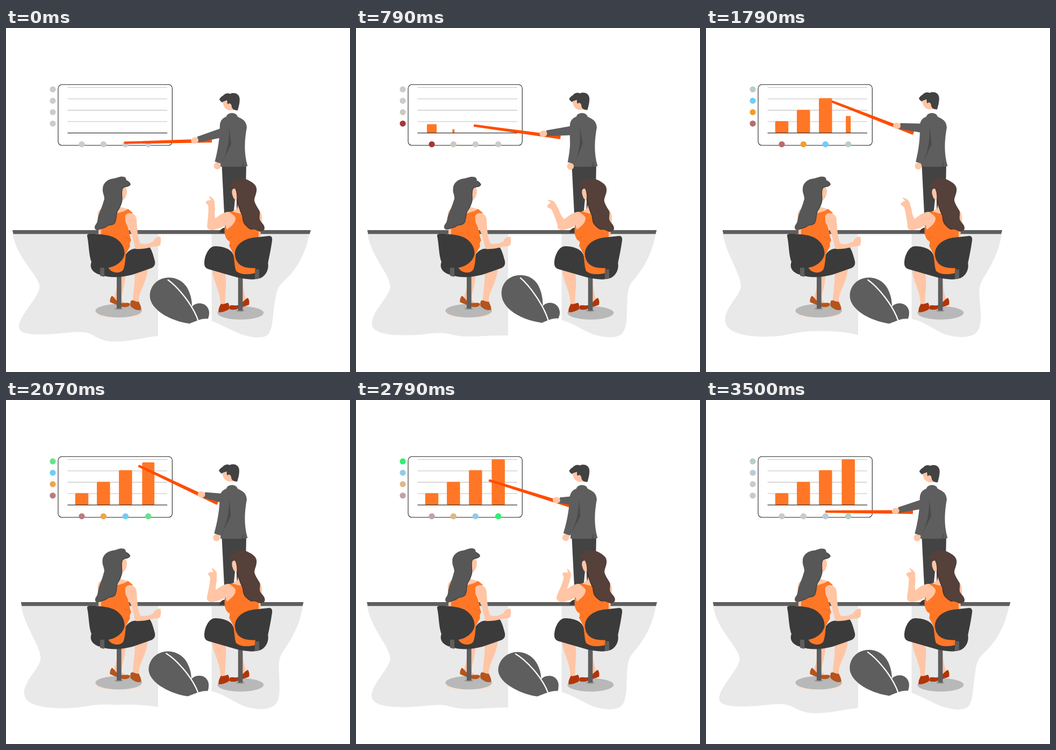
Animation, 640 px wide and 640 px high, one loop 3570 ms. Source, as an HTML page:

```html
<!DOCTYPE html>
<html lang="en">
<head>
<meta charset="utf-8">
<title>Presentation</title>
<style>
html, body { margin: 0; width: 100%; height: 100%; overflow: hidden; background: #fff; }
svg { display: block; width: 100%; height: 100%; }
.skin { fill: #ffc5a5; }
.orange { fill: #ff7726; }
.dark { fill: #3b3b3b; }
.suit { fill: #5e5e5e; }
.floor { fill: #e9e9e9; }
.line { fill: none; }
</style>
</head>
<body>
<svg viewBox="0 0 640 640">
  <path id="floorL" class="floor"/>
  <path id="floorR" class="floor"/>
  <path id="edge" class="suit"/>

  <path id="leaf" class="suit"/>
  <path id="vein" class="line" stroke="#fff" stroke-width="2.3"/>

  <g id="board">
    <rect class="line" x="97" y="105.3" width="212.3" height="113" rx="7" stroke="#222" stroke-width="1.1"/>
    <path class="line" stroke="#ccc" stroke-width="1.3" d="M114.5,110.6H300M114.5,131.8H300M114.5,153H300M114.5,174.2H300"/>
    <g id="bars" class="orange"></g>
    <path class="line" stroke="#333" stroke-width="1.2" d="M114.5,195.3H300"/>
    <g id="dots"></g>
  </g>

  <g id="man">
    <path id="pointer" fill="#ff4d00" stroke="#ff4d00" stroke-width="2" stroke-linejoin="round" d="M0,-1.2L161,-2.5V2.5L0,1.2Z"/>
    <path fill="#434343" d="M401.5,256H447L445,350H430L428,298L423,350V378H408L406,345Z"/>
    <path class="dark" d="M397,381C397,376 402,372 408,371H412V381Z"/>
    <g id="head">
      <path class="skin" d="M403,136C403.5,144 407,151 415,153H424V136Z"/>
      <path fill="#424242" d="M397,133C399,128 403,127 405,124.5C409,120.5 414,121 417,122.5C424,119 433,122 434.5,130C435.5,138 433,146 431,153.3C427,153 422,153 420,147C420,141 415,138 413,142C411,140 412,137 411,134.5C408,136.5 406,135 402,138.5C400,137 398,135 397,133Z"/>
    </g>
    <path class="suit" d="M410,165C411,157 428,155 431,165C438,169 447,171 448,185C444,207 442,232 449.5,257C434,259 415,258 399,258C400,235 397,205 398,180C399,171 404,167 410,165Z"/>
    <path class="line" stroke="#444" stroke-width="1.2" d="M441.5,250L440,258"/>
    <g id="sleeve">
      <ellipse class="skin" cx="393" cy="256.5" rx="6.3" ry="6.5"/>
      <path fill="#4b4b4b" d="M415.5,184L419,216L402,250L404,235Z"/>
      <path class="suit" d="M398,178C398,205 394,228 388.5,248.5L400.5,252.5C411,233 416,210 415.5,182Z"/>
    </g>
    <path id="arm" class="suit"/>
    <ellipse id="hand" class="skin" rx="7" ry="5.8"/>
  </g>

  <g id="womanL">
    <ellipse cx="209" cy="534" rx="43" ry="5" fill="#f6e2d7"/>
    <ellipse cx="209.7" cy="526" rx="43.3" ry="12.5" fill="#b8b8b8"/>
    <ellipse cx="209.7" cy="522" rx="8" ry="2.2" fill="#999"/>
    <path class="skin" d="M207,460H222C222,480 213,498 216,507L223,513L203,507C199,499 206,490 207,475ZM239,453L264,447C261,478 246,490 247,510L236,508C236,490 241,475 239,453Z"/>
    <path fill="#b5541c" d="M197,498C203,502 205,509 213,511C220,513 226,509 231,513C230,519 223,520 217,519C208,516 200,513 193.5,510C193,506 194,502 197,498ZM233,507C239,506 240,510 247,509C249,514 252,518 251.5,524C244,527 236,522 231.5,517C231,513 231,510 233,507Z"/>
    <rect class="suit" x="206" y="458" width="8.6" height="64"/>
    <path class="dark" d="M159,435C155,445 160,455 175,459C195,466 215,464 235,459L268,447.5C276,445 278,440 277,434C274,422 271,412 266,406L240,410.5C232,411 224,417 221,425L215,438Z"/>
    <path class="skin" d="M177,336C169,341 170,350 172,360V385H181L184,345ZM217,296C222,293 225.5,299 225,306C224,313 221,318 217,320.5C213,315 213,305 217,296ZM212,333C219,334 224,336 229,338L222,347H202Z"/>
    <path class="orange" d="M203,347C211,342 221,342 227,336.5L236,344L231,349C225,346 221,354 223,362C230,374 229,385 233,395C230,399 230,403 231,406L223,420C222,432 221,444 218,450C215,454 210,455 206,455C195,454 188,448 186,430L178,395C176,380 177,370 180,360Z"/>
    <path class="line" stroke="#e5641a" d="M219,388L230,393"/>
    <path class="skin" d="M222,349C227,341 241,343 243,356C244,376 245,390 250,401C260,403 267,401 274,397C276,391 283,388 287,388C289,393 288.5,400 286.5,404.5C282,407 277,406 273,407C262,410 250,412 241,411C237,398 236,386 229,374C224,365 221,356 222,349Z"/>
    <path class="dark" d="M151,387C150.5,383 154,383 158,383C176,383 195,385 205,392C215,399 221,409 220.5,420C219,433 205,444 190,446C175,447 162,443 158,433C154,420 154,400 151,387Z"/>
    <path class="suit" d="M175,446H183V463L175,461Z"/>
    <g id="hairL">
      <path fill="#575757" d="M180,299C180,288 190,281 200,280C207,279 210,276 217,276.5C223,276.5 224,281 224,284C228,286 231,288 231.5,291C227,298 221,293 217,298C214,305 217,315 216,322C214,330 211,336 208,340C205,346 206,356 203,362C198,369 193,365 188,369C183,374 178,372 174,375C170,377 165,376 165,371C165,366 169,365 170,359C171,350 174,343 177,336C180,329 181,324 183,318C183,311 179,306 180,299Z"/>
      <path class="line" stroke="#464646" stroke-width="1.6" d="M224,284C228,286 230.5,288 231,291C227,297 221,293 217,298C213.5,305 216.5,315 215.5,322C213.5,330 210.5,336 207.5,340C204.5,346 205.5,356 202.5,362C198,368.5 193,364.5 188,368.5C183,373 178,371.5 174,374.5"/>
    </g>
  </g>

  <g id="womanR">
    <ellipse cx="436.4" cy="530" rx="43" ry="12.5" fill="#b8b8b8"/>
    <ellipse cx="436" cy="526" rx="8" ry="2.2" fill="#999"/>
    <path class="skin" d="M383,450L408,457C412,478 406,495 408,515L399,514C399,490 388,478 383,450ZM432,460H440C440,480 443,495 447,505L432,516Z"/>
    <path fill="#b23507" d="M400,513C405,515 409,512 413,511C416,515 416,520 414,524C408,527 402,529 396,529C394,525 397,518 400,513ZM416,517C421,514 427,518 433,515C440,512 444,505 450,502C453,506 453,511 452,515C445,518 438,519 432,522C426,525 418,525 415,522Z"/>
    <rect class="suit" x="431.8" y="462" width="8.6" height="64"/>
    <path class="dark" d="M369,438C369,424 377,406 389,406C402,406 421,410 424,425L440,440L487,436C490,446 485,460 474,465C460,470 445,467 430,464L378,449C371,447 369,443 369,438Z"/>
    <path class="skin" d="M468,337C475,340 477,350 476,360L473,388H464ZM421,301C424,297 428,299 430,303L431,318C428,322 424,319 422,313C420,308 420,304 421,301ZM431,318C431,330 431,338 419,342L440,352V325Z"/>
    <path class="orange" d="M417,342C424,340 430,346 442,346L470,345V390L463,456C448,460 434,458 428,452C425,444 425,432 423,420L415,405C417,401 416,399 416,397C409,394 405,384 407,369C409,371 411,366 412,365C416,358 419,350 417,342Z"/>
    <path class="line" stroke="#e5641a" d="M412,393L421,388"/>
    <path class="skin" d="M416,342C406,341 398,348 388,355L376,364C372,373 378,377 386,375.5C395,374 402,371 408,367L411,375C419,369 428,362 427,353C424,347 419,346 416,342Z"/>
    <path id="forearm" class="skin" d="M374.3,368C375,357 377,346 376.5,332C375,327 371,327 372,323C375,320 378,321 381,319.5C380,317 377,315 378,312.5C382,315 385,317 387,320C389,325 388,330 389,336C388,345 388,352 391,360C393,370 386,376 380,375C376,374 374,372 374.3,368Z"/>
    <path class="dark" d="M426,422C425,405 440,393 460,390L488,387C494,386 496,390 495,396C493,410 490,425 487,439C480,446 465,448 450,446C435,444 427,435 426,422Z"/>
    <path class="suit" d="M463,449H471V466L463,467Z"/>
    <g id="hairR">
      <path fill="#55403a" d="M416,294C417,286 423,285 426,281C430,280 433,281 436,280.5C444,279 452,283 459,288C466,293 467,299 466,304C465,311 462,315 462,321C464,329 469,335 472,341C473,346 471,351 472,356C474,362 481,365 481,372C481,377 477,378 473,379C468,378 464,374 458,375C451,374 451,370 446,367C440,362 441,355 440,349C435,343 434,335 432,327L430,337C428,330 430,322 430,318C431,310 430,303 427,299C423,296 419,299 416,294Z"/>
      <path class="line" stroke="#46332e" stroke-width="1.5" d="M427,299C430,305 430.5,313 430,320C433,335 437,342 440,349C441,357 441,362 446,367C451,371 452,374 458,374.5"/>
    </g>
  </g>
</svg>

<script>
const LOOP = 3570;
const TURN = 1720;
const byId = id => document.getElementById(id);
const set = (el, attrs) => { for (const k in attrs) el.setAttribute(k, attrs[k]); };
const add = (parent, tag, attrs) => {
  const el = document.createElementNS('http://www.w3.org/2000/svg', tag);
  set(el, attrs);
  return parent.appendChild(el);
};
const lerp = (a, b, p) => a + (b - a) * p;
const clamp = p => Math.max(0, Math.min(1, p));

// Piecewise linear track over a shared set of times
const TIMES = [0, 790, 1190, 1290, 1790, 2290, 2380, 2790, 3500, LOOP];
function track(values, t) {
  let i = 1;
  while (i < TIMES.length - 1 && t > TIMES[i]) i++;
  return lerp(values[i - 1], values[i], (t - TIMES[i - 1]) / (TIMES[i] - TIMES[i - 1]));
}

const POSE = {
  tipX: [221, 220, 223, 224, 235, 257, 255.5, 248, 223, 221],
  tipY: [213.5, 181.5, 165, 160.5, 137, 111.5, 118, 149.5, 207.5, 213.5],
  stick: [-1.4, 7.8, 13.2, 14.5, 21.2, 28.5, 26.5, 17.4, 0.35, -1.4],
  cuffX: [357, 354.5, 356.5, 357, 361, 376, 376.7, 379, 358.5, 357],
  cuffY: [207.5, 196, 191.6, 190.5, 182.5, 172.5, 175, 186.5, 205, 207.5],
  armY: [193, 190, 189, 188.7, 187, 181, 182, 187.5, 192, 193],
  sleeve: [0, -4, -5.3, -5, -1.3, 2.6, 2.8, 2, 0.1, 0],
  forearm: [0, -25, -37, -36, -14, 22, 23.5, 17.5, 1.5, 0]
};

// Outlines in their two extreme poses
const FLOOR_L = [
  'M12.5,383C20,430 62,460 62.5,482C62,500 24,535 24,556C24,572 60,571 90,569C120,567 138,563 154,568C165,572 177,584 205,583.5C235,583 260,575 283,573V383Z',
  'M32,383C38,420 64,455 65,480C65,497 36,518 36,542C36,566 68,574 112,574.5C135,575 150,571 170,567C185,564 198,563 215,563C242,562 268,567 283,571V383Z'
];
const FLOOR_R = [
  'M564.5,383C556,425 538,452 518,470C504,482 503,492 500,510C496,535 497,560 487,571C476,579 458,576 438,570C418,562 402,552 382.5,545V383Z',
  'M549.5,383C544,420 527,447 515,467C507,482 508,492 510,510C512,535 515,555 503,567C489,578 465,576 445,570C422,560 405,545 382.5,541V383Z'
];
const LEAF = [
  'M336,552C312,549 286,536 273,523C265,514 263,507 264,500C267,481 283,470 301,470C318,471 331,481 337,493C342,503 344,511 344,520C348,515 354,513 361,513.5C371,514 377,523 376.5,531C376,535 377,538 375,541.5C362,540.5 350,547 336,552Z',
  'M347,548C325,545 303,537 290,526C276,515 271,503 271.5,490C273,470 288,458.5 307,458.5C325,459 337,469 342,483C347,495 348,506 348,517C352,512 358,511 363,511C373,512 379,520 379.5,529C379.5,533 378,537 376.5,540.5C367,539 357,544 347,548Z'
];
const VEIN = [
  'M295,473C315,484 345,514 357,544',
  'M306.5,463.5C323,478 349,514 358,544.5'
];
function morph([a, b], p) {
  const nums = b.match(/[\d.]+/g);
  let i = 0;
  return a.replace(/[\d.]+/g, n => lerp(+n, +nums[i++], p).toFixed(2));
}

// Chart columns: centre, height, growth start, dot colour, fade in and fade out times
const GROW = 500;
const COLUMNS = [
  { x: 141, h: 22, start: 420, rgb: [163, 50, 54], fade: [200, 700, 700, 3570] },
  { x: 181.3, h: 43, start: 710, rgb: [245, 154, 31], fade: [740, 1400, 1640, 3570] },
  { x: 222.3, h: 64.7, start: 1150, rgb: [111, 205, 247], fade: [1130, 1650, 2090, 3880] },
  { x: 264.7, h: 85, start: 1605, rgb: [50, 238, 113], fade: [1730, 2240, 2800, 3610] }
];
COLUMNS.forEach((c, i) => {
  c.bar = add(byId('bars'), 'rect', {});
  c.dots = [[87, 177.8 - i * 21.2], [c.x, 216.3]].map(([cx, cy]) =>
    add(byId('dots'), 'circle', { cx, cy, r: 5.6 }));
});

const part = {};
['floorL', 'floorR', 'edge', 'leaf', 'vein', 'pointer', 'head', 'sleeve', 'arm', 'hand', 'hairL', 'forearm', 'hairR']
  .forEach(id => part[id] = byId(id));
const turn = (el, deg, x, y) => set(el, { transform: `rotate(${deg} ${x} ${y})` });

function drawChart(t) {
  for (const c of COLUMNS) {
    const s = clamp((t - c.start) / GROW);
    const w = 24.5 * s, h = c.h * s;
    set(c.bar, { x: c.x - w / 2, y: 195.3 - h, width: w, height: h, rx: 2 * s });
    const [in0, in1, out0, out1] = c.fade;
    const p = clamp((t - in0) / (in1 - in0)) * (1 - clamp((t - out0) / (out1 - out0)));
    const fill = `rgb(${c.rgb.map(v => Math.round(lerp(204, v, p)))})`;
    c.dots.forEach(d => set(d, { fill }));
  }
}

function drawArms(t) {
  const at = name => track(POSE[name], t);
  set(part.pointer, { transform: `translate(${at('tipX')} ${at('tipY')}) rotate(${at('stick')})` });
  const x = at('cuffX'), y = at('cuffY'), bx = 409, by = at('armY');
  const a = Math.atan2(by - y, bx - x), nx = -Math.sin(a), ny = Math.cos(a);
  const pt = (px, py, r) => `${px + nx * r},${py + ny * r}`;
  set(part.arm, { d: `M${pt(x, y, -5.4)}L${pt(bx, by, -9)}L${pt(bx, by, 9)}L${pt(x, y, 5.4)}Z` });
  const hx = x - 6 * Math.cos(a), hy = y - 6 * Math.sin(a);
  set(part.hand, { cx: hx, cy: hy });
  turn(part.hand, a * 180 / Math.PI, hx, hy);
  turn(part.sleeve, at('sleeve'), 408, 172);
  turn(part.forearm, at('forearm'), 383, 364);
}

// Swings 0, 1, -1, 0 over equal thirds of the loop
function swing(t) {
  const p = 3 * t / LOOP;
  return p < 1 ? p : p < 2 ? 3 - 2 * p : p - 3;
}

function draw(t) {
  const w = t < TURN ? t / TURN : (LOOP - t) / (LOOP - TURN);
  const s = swing(t);
  const left = lerp(12, 31.5, w), right = lerp(567, 550.5, w);

  set(part.floorL, { d: morph(FLOOR_L, w) });
  set(part.floorR, { d: morph(FLOOR_R, w) });
  set(part.edge, { d: `M${left},376H${right}L${right - 2},383.2H${left + 1.5}Z` });
  set(part.head, { transform: `translate(${-w} ${-1.8 * w})` });
  const lean = 0.5 + 0.6 * s;
  set(part.leaf, { d: morph(LEAF, lean) });
  set(part.vein, { d: morph(VEIN, lean) });
  turn(part.hairL, s * 2.2, 200, 325);
  turn(part.hairR, s * 1.1, 430, 300);
  drawChart(t);
  drawArms(t);
}

function tick() {
  draw(performance.now() % LOOP);
  requestAnimationFrame(tick);
}
tick();
</script>
</body>
</html>
```
